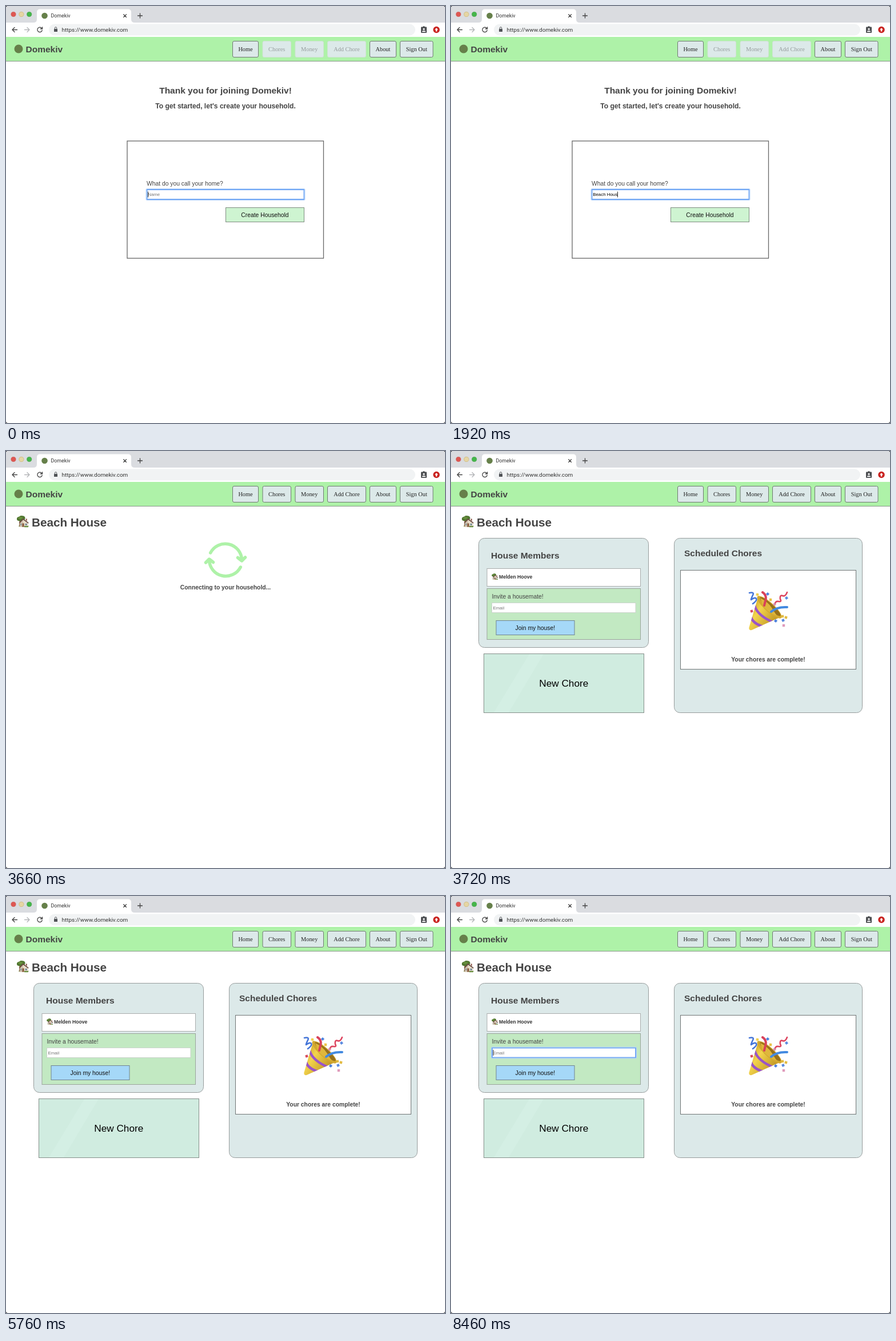
Recreate the animation shown at these times as an HTML page. Size 768 px wide and 729 px high, loop 8520 ms.

```html
<!DOCTYPE html>
<html lang="en">
<head>
<meta charset="utf-8">
<title>Domekiv</title>
<style>
  html, body { margin: 0; width: 100%; height: 100%; overflow: hidden; background: #222; }
  svg { display: block; width: 768px; height: 729px; }
  text { font: 10.34px "Liberation Sans", Arial, sans-serif; fill: #444; white-space: pre; }
  .mid { text-anchor: middle; }
  .b { font-weight: bold; }
  .h1 { font-size: 20.7px; }
  .h2 { font-size: 15.5px; }
  .h3 { font-size: 12.08px; }
  .dark { fill: #111; }
  .small { font-size: 7.9px; fill: #000; }
  .small.hint { fill: #777; }
  .ui { font-family: Roboto, "Open Sans", sans-serif; fill: #333; }
  .nav text { font-family: "Liberation Serif", "Times New Roman", serif; fill: #222; }
  .nav rect { fill: #dce9e9; stroke: #6f7a72; }
  .nav .off text { fill: #969d9d; }
  .nav .off rect { stroke: #cfe3d3; }
  .panel { fill: #dce9e9; stroke: #979c9c; }
  .line { fill: none; stroke-linecap: round; stroke-linejoin: round; }
  .focus rect { fill: #fff; stroke: #74a9f4; stroke-width: 2; }
  .focus .glow { fill: none; stroke: #b9d5fb; stroke-width: 1; }
  .caret { stroke: #111; stroke-width: .9; }
</style>
</head>
<body>
<svg viewBox="0 0 768 729">
  <defs>
    <symbol id="house" viewBox="0 0 20 20">
      <path d="M4 18.4h15l1-1.4H3z" fill="#7f9a4c"/>
      <path d="M4.6 8h2.3v10H4.2z" fill="#7b5638"/>
      <path d="M.4 5.2Q1 2.4 4.2 2 6-.2 9.4.6q4 .2 4.5 3.2.6 3-3 4L5 9.4Q-.2 9 .4 5.2z" fill="#50762f"/>
      <path d="M2 4.5Q5 1.5 8 2.5l3 2-5 2z" fill="#688f3e"/>
      <path d="M5.6 11.2 10.6 6l7.8 5v7.8H5.6z" fill="#eadfcc"/>
      <path d="M5.6 11.2 10.6 6l.5 12.8H5.6z" fill="#d3c4b0"/>
      <path d="M4.2 11.8 10.4 4.8l9.4 7.2-.9 1.3-8.2-6.2L5 13z" fill="#694a40"/>
      <path d="M15 5.5h2v4l-2-1.5z" fill="#8c5546"/>
      <path d="M9.2 13h3v5.8h-3z" fill="#865a3d"/>
      <path d="M14 13.2h3v3h-3zM6.5 13.2h1.6v3H6.5z" fill="#778e9b"/>
      <path d="M12.5 17.2h6.5v2h-6.5z" fill="#668b3d"/>
    </symbol>
    <linearGradient id="gold" x1="0" y1="0" x2="1" y2=".7">
      <stop offset="0" stop-color="#b98b19"/>
      <stop offset=".4" stop-color="#f3d44c"/>
      <stop offset="1" stop-color="#b78a1c"/>
    </linearGradient>
    <clipPath id="cone"><path d="M537 256 521.3 309Q521 314 526 313L577 290Z"/></clipPath>
  </defs>

  <rect width="768" height="729" rx="3.5" fill="#fff"/>
  <path d="M0 29V4Q0 0 4 0H764Q768 0 768 4V29Z" fill="#dadce0"/>
  <path d="M48 29Q54 29 54 23V11Q54 5.5 59.5 5.5H213.5Q219 5.5 219 11V23Q219 29 225 29Z" fill="#fff"/>
  <g stroke-width=".6">
    <circle cx="13" cy="14.5" r="4.1" fill="#de5752" stroke="#c94843"/>
    <circle cx="26.9" cy="14.5" r="4.1" fill="#e5d6a4" stroke="#c9ae5d"/>
    <circle cx="40.7" cy="14.5" r="4.1" fill="#45b64a" stroke="#369a3c"/>
  </g>
  <circle cx="67.5" cy="17" r="5.3" fill="#66804a"/>
  <text class="ui" x="78.5" y="20.2" style="font-size:8.8px">Domekiv</text>
  <g class="line" stroke="#444" stroke-width="1.3">
    <path d="m205.7 14.7 4.8 4.8m0-4.8-4.8 4.8M234.5 13v8m-4-4h8"/>
    <path d="M19.5 41.5H11m4-4-4 4 4 4"/>
    <path d="M32.5 41.5H41m-4-4 4 4-4 4" stroke="#b3b5b8"/>
    <path d="M62.7 39.2a4.2 4.2 0 1 0 .5 3.3"/>
    <path d="M63.5 37v3h-3" stroke-width="1.5"/>
  </g>
  <rect x="75" y="31.5" width="641" height="20" rx="10" fill="#f1f3f4"/>
  <rect x="84" y="40" width="6" height="5" rx=".6" fill="#505357"/>
  <path class="line" d="M85.3 40v-1.5a1.7 1.7 0 0 1 3.4 0V40" stroke="#505357"/>
  <text class="ui" x="97.5" y="45" style="font-size:9.95px">https://www.domekiv.com</text>
  <rect x="726" y="36.5" width="10" height="10.5" rx="1" fill="#4d4f52"/>
  <circle cx="731" cy="36.5" r="1.5" fill="#4d4f52"/>
  <circle cx="731" cy="40.3" r="1.6" fill="#fff"/>
  <path d="M727.8 45.3q0-2.4 3.2-2.4t3.2 2.4z" fill="#fff"/>
  <circle cx="753" cy="41.5" r="5.7" fill="#c9221f"/>
  <path d="m753 38.2 3 3.3h-1.8v3h-2.4v-3H750z" fill="#fff"/>

  <rect y="54" width="768" height="43" fill="#aef2a8"/>
  <path d="M0 96.5H768" stroke="#89978a"/>
  <circle cx="22" cy="75" r="7.5" fill="#66804a"/>
  <text class="b h2" x="34.5" y="80.7">Domekiv</text>
  <g class="nav" id="nav"></g>

  <g id="form">
    <text class="mid b h2" x="384" y="152.5">Thank you for joining Domekiv!</text>
    <text class="mid b h3" x="384" y="179.2">To get started, let's create your household.</text>
    <rect x="212" y="236" width="343.5" height="205" fill="#fff" stroke="#666" stroke-width="1.3"/>
    <text x="246" y="313.8">What do you call your home?</text>
    <g class="focus">
      <rect x="246.5" y="321" width="275" height="17"/>
      <rect class="glow" x="245" y="319.5" width="278" height="20" rx="1.5"/>
    </g>
    <text class="small" id="typed" x="248.2" y="332.3"></text>
    <path class="caret" id="caret" d="M0 324.5v10"/>
    <rect x="384.5" y="352.5" width="137" height="25" fill="#cef4d1" stroke="#7f8d81"/>
    <text class="mid dark" x="453" y="368.5">Create Household</text>
  </g>

  <g id="home">
    <use href="#house" x="18.5" y="112.5" width="21.5" height="21.5"/>
    <text class="b h1" x="45" y="131.6">Beach House</text>

    <g id="wait">
      <g id="ring" class="line" stroke="#aef2a8" stroke-width="5.5" transform="translate(384 190.5)"></g>
      <text class="mid b" x="384" y="242">Connecting to your household...</text>
    </g>

    <g id="board">
      <rect class="panel" x="48.5" y="152.5" width="297" height="191" rx="10"/>
      <text class="b h2" x="70" y="187.7">House Members</text>
      <rect x="63" y="205.5" width="268.5" height="31" fill="#fff" stroke="#aaadad"/>
      <use href="#house" x="71" y="214" width="11.5" height="11.5"/>
      <text class="b" x="84" y="223.3" style="font-size:8.6px;fill:#333">Melden Hoove</text>
      <rect x="63" y="240.5" width="268.5" height="89" fill="#c2e9c2" stroke="#9ba59c"/>
      <text x="71.5" y="257.8">Invite a housemate!</text>
      <rect x="71.5" y="265.5" width="251.5" height="17" fill="#fff" stroke="#cbd3cc"/>
      <g id="emailFocus">
        <g class="focus">
          <rect x="72" y="265.5" width="251" height="17"/>
          <rect class="glow" x="70.5" y="264" width="254" height="20" rx="1.5"/>
        </g>
        <path class="caret" d="M74 269v10"/>
      </g>
      <text class="small hint" x="73.5" y="276.7">Email</text>
      <rect x="79" y="296.5" width="137" height="25" fill="#a5d8f8" stroke="#718492"/>
      <text class="mid dark" x="147.3" y="313.2">Join my house!</text>
      <rect x="57.5" y="354.5" width="280" height="103" fill="#d0ece0" stroke="#858f8a"/>
      <path d="M137 355h25l-61 102H75z" fill="#d4efe4"/>
      <text class="mid" x="197.3" y="412" style="font-size:17.2px;fill:#000">New Chore</text>

      <rect class="panel" x="390.5" y="152.5" width="329" height="305" rx="10"/>
      <text class="b h2" x="408" y="184.3">Scheduled Chores</text>
      <rect x="401.5" y="208.5" width="307" height="173" fill="#fff" stroke="#707575"/>
      <g id="popper">
        <path d="M537 256 521.3 309Q521 314 526 313L577 290Z" fill="url(#gold)"/>
        <g clip-path="url(#cone)" fill="none" stroke="#9a55c8" stroke-width="4.5">
          <path d="M531 270q5 18 34 30M525 290q2 11 23 18"/>
        </g>
        <ellipse cx="557" cy="273" rx="28" ry="8" transform="rotate(42 557 273)" fill="#d3a92f"/>
        <ellipse cx="558.5" cy="272" rx="24" ry="5" transform="rotate(42 558.5 272)" fill="#97701a"/>
        <path d="M541 257q13 6 20 17l9 14q-15-5-24-17z" fill="#dfb73c"/>
        <g class="line" stroke-width="4">
          <path d="M545 247q8 5 5 15l-2 8" stroke="#d9425a"/>
          <path d="M560 281q10-9 28-8" stroke="#438ae0"/>
          <path d="M522 248q9-2 6 4t-3 8q7-5 9-2t-6 9" stroke="#4576d8" stroke-width="2.6"/>
          <path d="M588 247q-3 8-8 6t-4 6q3 5-3 4t-6 5" stroke="#dd4660" stroke-width="2.6"/>
        </g>
        <g id="confetti"></g>
      </g>
      <text class="mid b" x="555" y="367.8">Your chores are complete!</text>
    </g>
  </g>
</svg>
<script>
  const LOOP = 8520, STEP = 60;
  const CONNECT = 3660, READY = 3720, EMAIL = 8160;
  const NAME = 'Beach House', TYPE_FROM = 720, KEY = 120;
  const $ = id => document.getElementById(id);

  const buttons = [
    ['Home', 396.5, 45], ['Chores', 449, 49.5, true], ['Money', 506, 49.5, true],
    ['Add Chore', 562.5, 67, true], ['About', 636.5, 46], ['Sign Out', 689.5, 57.5]
  ];
  $('nav').innerHTML = buttons.map(([label, x, w, locked]) =>
    `<g${locked ? ' data-locked' : ''}>
      <rect x="${x}" y="61.5" width="${w}" height="28" rx="2.5"/>
      <text class="mid" x="${x + w / 2}" y="79">${label}</text></g>`).join('');
  const locked = document.querySelectorAll('[data-locked]');

  const arrow = '<path d="M-26.3-12.5A29 29 0 0 1 28.5 0M21.5-4 28.5 1.5 34.5-4.5"/>';
  $('ring').innerHTML = arrow + `<g transform="rotate(180)">${arrow}</g>`;

  const bits = [
    [536, 251, '#f0cf4f'], [554, 250, '#4b82df'], [526, 280, '#d84a5d'],
    [559, 260, '#eac34a'], [566, 268, '#d98fb0'], [587, 257, '#5b8be0'],
    [580, 289, '#e2bb43'], [586, 291, '#e2bb43'], [568, 297, '#4a7fdc'],
    [581, 296, '#5b8be0'], [582, 305, '#df9bbb']
  ];
  $('confetti').innerHTML = bits.map(([x, y, c], i) =>
    `<rect x="-2.2" y="-2.2" width="4.4" height="4.4" fill="${c}"
      transform="translate(${x} ${y}) rotate(${20 + i * 25})"/>`).join('');

  const show = (id, on) => $(id).style.display = on ? '' : 'none';

  function draw(t) {
    const joined = t >= CONNECT;
    show('form', !joined);
    show('home', joined);
    show('wait', t < READY);
    show('board', t >= READY);
    show('emailFocus', t >= EMAIL);
    locked.forEach(el => el.classList.toggle('off', !joined));

    const count = Math.max(0, Math.min(NAME.length, Math.floor((t - TYPE_FROM) / KEY)));
    const typed = $('typed');
    typed.textContent = count ? NAME.slice(0, count) : 'Name';
    typed.classList.toggle('hint', !count);
    const end = count && !joined ? typed.getComputedTextLength() : 0;
    $('caret').setAttribute('transform', `translate(${248.5 + end} 0)`);
  }

  const start = performance.now();
  function tick() {
    const t = (performance.now() - start) % LOOP;
    draw(Math.floor(t / STEP) * STEP);
    requestAnimationFrame(tick);
  }
  tick();
</script>
</body>
</html>
```
